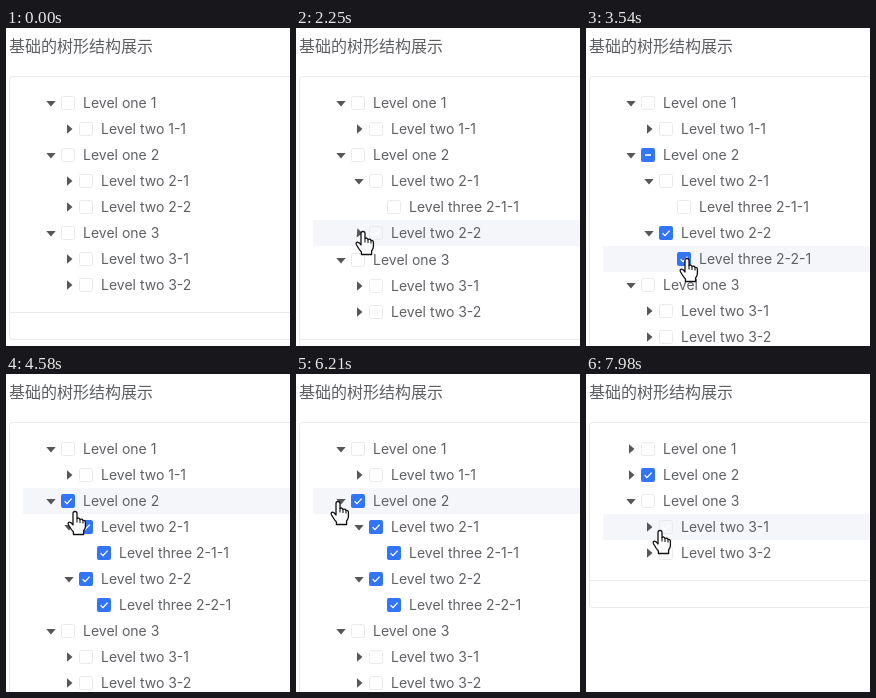
An HTML page with a canvas for the animation above (8000 ms loop, 284 by 318 pixels).

```html
<!DOCTYPE html>
<html lang="zh">
<head>
<meta charset="utf-8">
<style>
html, body { margin: 0; width: 100%; height: 100%; overflow: hidden; background: #fff; }
canvas { display: block; }
</style>
</head>
<body>
<canvas id="stage" width="284" height="318"></canvas>
<script>
const ctx = document.getElementById('stage').getContext('2d');
const W = 284, H = 318, LOOP = 8000;
const ROW = 26, TOP = 62, INDENT = 18;
const BLUE = '#3375fa', LINE = '#ebebee', HOVER = '#f4f6fa', TEXT = '#5f6165';

const never = Infinity;
const node = (label, kids = [], opts = {}) =>
  ({ label, kids, open: false, toggle: never, check: never, half: never, ...opts });

const tree = [
  node('Level one 1', [node('Level two 1-1', [node('Level three 1-1-1')])], { open: true, toggle: 7560 }),
  node('Level one 2', [
    node('Level two 2-1', [node('Level three 2-1-1', [], { check: 4300 })], { toggle: 1190, check: 4300 }),
    node('Level two 2-2', [node('Level three 2-2-1', [], { check: 3300 })], { toggle: 2210, check: 3300 })
  ], { open: true, toggle: 6455, half: 3300, check: 4300 }),
  node('Level one 3', [
    node('Level two 3-1', [node('Level three 3-1-1')]),
    node('Level two 3-2', [node('Level three 3-2-1')])
  ], { open: true })
];

// Pointer path: time, x, y of the fingertip
const path = [
  [190, 76, 326], [900, 60, 156], [970, 60, 154],
  [1480, 60, 154], [1790, 65, 200], [2040, 65, 200], [2190, 67, 203],
  [2530, 67, 203], [2810, 88, 222], [2870, 88, 222], [3180, 101, 232],
  [3400, 101, 230], [3680, 101, 230], [3740, 101, 230], [4150, 69, 137],
  [4580, 69, 137], [5040, 93, 213], [5650, 93, 213],
  [6050, 37, 130], [6200, 42, 127], [6790, 42, 127], [7160, 40, 79],
  [7280, 40, 79], [7420, 47, 76], [7640, 47, 76], [7970, 74, 156]
];

const clamp = v => Math.max(0, Math.min(1, v));
const ease = v => { v = clamp(v); return v * v * (3 - 2 * v); };

function pointerAt(t) {
  let i = 0;
  while (i < path.length - 2 && t >= path[i + 1][0]) i++;
  const [t0, x0, y0] = path[i], [t1, x1, y1] = path[i + 1];
  const k = ease((t - t0) / (t1 - t0));
  return { x: Math.round(x0 + (x1 - x0) * k), y: Math.round(y0 + (y1 - y0) * k) };
}

function openness(n, t) {
  const k = ease((t - n.toggle) / 300);
  return n.open ? 1 - k : k;
}

const kidsHeight = (n, t) => {
  const k = openness(n, t);
  return k ? Math.round(k * listHeight(n.kids, t)) : 0;
};
const listHeight = (list, t) => list.reduce((sum, n) => sum + ROW + kidsHeight(n, t), 0);

function stroke(points, color, width) {
  ctx.beginPath();
  points.forEach(([x, y]) => ctx.lineTo(x, y));
  ctx.strokeStyle = color;
  ctx.lineWidth = width;
  ctx.stroke();
}

function box(x, y, w, h, r) {
  ctx.beginPath();
  ctx.roundRect(x, y, w, h, r);
}

function drawArrow(x, y, k) {
  ctx.save();
  ctx.translate(x, y);
  ctx.rotate(k * Math.PI / 2);
  ctx.beginPath();
  ctx.moveTo(-2, -4.7);
  ctx.lineTo(3.5, 0);
  ctx.lineTo(-2, 4.7);
  ctx.fillStyle = '#55575b';
  ctx.fill();
  ctx.restore();
}

function drawCheckbox(n, x, y, t, hovered) {
  const full = clamp((t - n.check) / 150);
  const half = clamp((t - n.half) / 150);
  const tick = [[x + 3.6, y + 7.2], [x + 6, y + 9.6], [x + 10.6, y + 4.6]];
  box(x + .5, y + .5, 13, 13, 2);
  ctx.fillStyle = hovered ? HOVER : '#fff';
  ctx.fill();
  ctx.strokeStyle = '#e9eaed';
  ctx.lineWidth = 1;
  ctx.stroke();
  if (hovered) stroke(tick, '#fff', 1.3);
  ctx.globalAlpha *= Math.max(full, half);
  box(x, y, 14, 14, 2);
  ctx.fillStyle = BLUE;
  ctx.fill();
  if (full) stroke(tick, '#fff', 1.3);
  else stroke([[x + 4, y + 7], [x + 10, y + 7]], '#fff', 1.6);
  ctx.globalAlpha = 1;
}

function drawRow(n, y, level, t, pointer) {
  const mid = y + ROW / 2, dx = level * INDENT;
  const hovered = pointer.y >= y && pointer.y < y + ROW;
  if (hovered) {
    ctx.fillStyle = HOVER;
    ctx.fillRect(17, y, W - 17, ROW);
  }
  if (n.kids.length) drawArrow(45 + dx, mid, openness(n, t));
  drawCheckbox(n, 55 + dx, mid - 7, t, hovered);
  ctx.font = '14px Inter, sans-serif';
  ctx.fillStyle = TEXT;
  ctx.fillText(n.label, 77 + dx, mid + 5);
}

function drawList(list, y, level, t, pointer) {
  for (const n of list) {
    drawRow(n, y, level, t, pointer);
    y += ROW;
    const h = kidsHeight(n, t);
    if (h) {
      ctx.save();
      ctx.beginPath();
      ctx.rect(0, y, W, h);
      ctx.clip();
      drawList(n.kids, y, level + 1, t, pointer);
      ctx.restore();
    }
    y += h;
  }
  return y;
}

const hand = new Path2D(
  'M-2 2Q-2 0 0 0T2 2V7Q4 5.6 5 8Q7 6.8 8 9Q10.4 8.3 10.4 11V15' +
  'Q10.4 17 8.6 19.5V23H-1.6V20.5Q-4 18-6.4 13.5Q-7.6 11-5.6 10.6Q-4 10.4-2 13.5Z');

function drawHand({ x, y }) {
  ctx.save();
  ctx.translate(x, y + .5);
  ctx.fillStyle = '#fff';
  ctx.fill(hand);
  ctx.strokeStyle = '#111';
  ctx.lineWidth = 1.3;
  ctx.lineJoin = 'round';
  ctx.stroke(hand);
  [[2, 7, 11], [5, 8, 11.5], [8, 9, 12]].forEach(([fx, a, b]) => stroke([[fx, a], [fx, b]], '#111', 1.1));
  ctx.restore();
}

function draw(t) {
  const pointer = pointerAt(t);
  ctx.fillStyle = '#fff';
  ctx.fillRect(0, 0, W, H);
  ctx.font = '16px "Noto Sans CJK SC", "Noto Sans CJK", sans-serif';
  ctx.fillStyle = '#5c5e62';
  ctx.fillText('基础的树形结构展示', 3, 24);

  const bottom = drawList(tree, TOP, 0, t, pointer);
  box(3.5, 48.5, W + 10, bottom + 41 - 14 - 34, 3);
  ctx.strokeStyle = LINE;
  ctx.lineWidth = 1;
  ctx.stroke();
  stroke([[4, bottom + 14.5], [W, bottom + 14.5]], LINE, 1);
  drawHand(pointer);
}

function frame(now) {
  draw(now % LOOP);
  requestAnimationFrame(frame);
}
requestAnimationFrame(frame);
</script>
</body>
</html>
```
